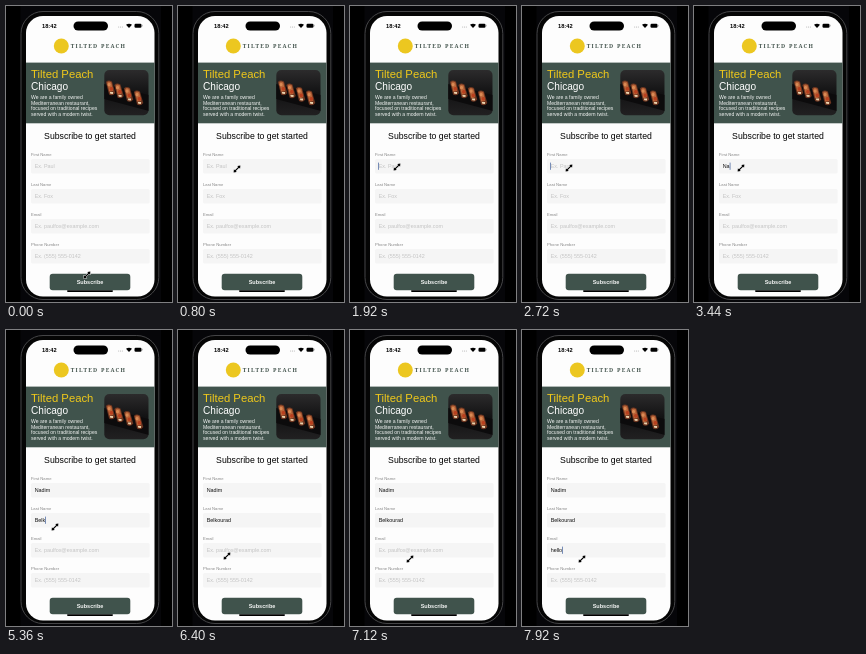
Write an HTML page that moves like this. It is 166 px wide and 296 px high and loops after 8 s.

```html
<!DOCTYPE html>
<html lang="en">
<head>
<meta charset="utf-8">
<title>Subscribe form</title>
<style>
  html, body { margin: 0; width: 100%; height: 100%; overflow: hidden; background: #000; }
  svg { display: block; width: 100vw; height: 100vh; font-family: "Liberation Sans", Arial, sans-serif; }
  .brand { font: 700 5.4px "Noto Serif", "Liberation Serif", serif; letter-spacing: 1.25px; fill: #43544d; }
  .intro { font-size: 5.1px; fill: #f4f6f5; }
  .label { font-size: 4.2px; fill: #858585; }
  .value { font-size: 5.4px; }
</style>
</head>
<body>
<svg viewBox="0 0 166 296">
  <defs>
    <clipPath id="photo"><rect x="98.3" y="64" width="44.2" height="45.3" rx="5"/></clipPath>
    <linearGradient id="table" x2="0" y2="1">
      <stop stop-color="#2c2b2c"/><stop offset=".5" stop-color="#121213"/><stop offset="1" stop-color="#222122"/>
    </linearGradient>
    <g id="bite">
      <path d="M-3-7Q0-9 3-6L3.4 6Q0 9-3 6Z" fill="#6e3620"/>
      <path d="M-2-6Q0-8 2.2-5L2 3Q0 4-2 3Z" fill="#b96539"/>
      <circle cx="-.6" cy="-3.6" r="1.6" fill="#d98a55"/>
      <circle cx=".6" cy="1" r="1.8" fill="#b8401f"/>
      <path d="M-1.6 3.6L1.6 4.4L1 6.4L-1.6 5.6Z" fill="#ead0ab"/>
    </g>
  </defs>
  <rect width="166" height="296"/>
  <rect x="14.5" width="140.5" height="296" fill="#060609"/>
  <rect x="15" y="5.5" width="137.8" height="288" rx="22" fill="#050505" stroke="#454547"/>
  <rect x="20" y="10" width="128.5" height="280.5" rx="17" fill="#fdfdfd"/>

  <text x="36" y="22" font-size="5.7" font-weight="700">18:42</text>
  <rect x="67.5" y="15.4" width="34.5" height="9.2" rx="4.6"/>
  <g fill="#aaa"><circle cx="112.7" cy="21" r=".5"/><circle cx="114.5" cy="21" r=".5"/><circle cx="116.3" cy="21" r=".5"/></g>
  <path d="M120 18.8Q123 16.5 126 18.8L123 22Z"/>
  <rect x="128.5" y="17.7" width="7" height="4" rx="1.2"/>
  <path d="M136.2 18.8v1.6" stroke="#888" stroke-width=".7"/>

  <circle cx="55.3" cy="40" r="7.5" fill="#ecc720"/>
  <text class="brand" x="64.8" y="42">TILTED PEACH</text>

  <rect x="20" y="56.6" width="128.5" height="60.7" fill="#40534c"/>
  <text x="25" y="72" font-size="11.3" fill="#f0c91a">Tilted Peach</text>
  <text x="25" y="84.3" font-size="10.1" fill="#fff">Chicago</text>
  <g class="intro">
    <text x="25" y="92.8">We are a family owned</text>
    <text x="25" y="98.6">Mediterranean restaurant,</text>
    <text x="25" y="104.4">focused on traditional recipes</text>
    <text x="25" y="110.2">served with a modern twist.</text>
  </g>
  <g clip-path="url(#photo)">
    <rect x="98" y="64" width="45" height="46" fill="url(#table)"/>
    <path d="M98 78L143 89V105L98 93Z" fill="#0c0b0c"/>
    <use href="#bite" transform="translate(104.5 82) rotate(-14)"/>
    <use href="#bite" transform="translate(113 85) rotate(-14)"/>
    <use href="#bite" transform="translate(122.5 88.5) rotate(-14)"/>
    <use href="#bite" transform="translate(132.5 92) rotate(-14)"/>
  </g>

  <text x="84" y="133" font-size="8.7" text-anchor="middle">Subscribe to get started</text>
  <g id="form"></g>
  <rect x="43.7" y="267.7" width="80.6" height="16.6" rx="3" fill="#40534c"/>
  <text x="84" y="278" font-size="5.5" font-weight="700" fill="#f4f6f5" text-anchor="middle">Subscribe</text>
  <rect x="61" y="284.3" width="46" height="1.6" rx=".8"/>
  <rect id="caret" width=".7" height="7.2" fill="#3f5f9c"/>
  <path id="cursor" d="M3.4-3.4L3.1-.2L2.1-1.2L-1.2 2.1L-.2 3.1L-3.4 3.4L-3.1.2L-2.1 1.2L1.2-2.1L.2-3.1Z"
        stroke="#fff" stroke-width=".8" paint-order="stroke" stroke-linejoin="round"/>
</svg>
<script>
const LOOP = 8000;
const $ = id => document.getElementById(id);

// keys: the moment each letter is typed
const fields = [
  { label: "First Name", hint: "Ex. Paul", text: "Nadim", focus: 1500, keys: [2960, 3200, 3560, 3760, 4000] },
  { label: "Last Name", hint: "Ex. Fox", text: "Belkourad", focus: 4560,
    keys: [4880, 5040, 5160, 5280, 5400, 5520, 5640, 5720, 5840] },
  { label: "Email", hint: "Ex. paulfox@example.com", text: "hello", focus: 6560, keys: [7160, 7280, 7400, 7520, 7680] },
  { label: "Phone Number", hint: "Ex. (555) 555-0142", text: "", focus: Infinity, keys: [] }
];

// time, x, y
const path = [
  [0, 81, 269], [80, 81, 269], [720, 59, 163], [960, 59, 163], [1440, 47, 161], [2000, 47, 161],
  [2500, 47, 162], [3680, 47, 162], [4240, 49, 197], [6200, 49, 197], [6400, 49, 226],
  [6600, 49, 226], [6960, 60, 229], [LOOP, 60, 229]
];

function add(tag, attrs, text = "") {
  const el = document.createElementNS("http://www.w3.org/2000/svg", tag);
  for (const k in attrs) el.setAttribute(k, attrs[k]);
  el.textContent = text;
  return $("form").appendChild(el);
}

fields.forEach((f, i) => {
  f.y = 153 + 30 * i;
  add("text", { class: "label", x: 25, y: f.y - 2.7 }, f.label);
  add("rect", { x: 25, y: f.y, width: 118.6, height: 14.5, rx: 1.5, fill: "#f5f5f5" });
  f.el = add("text", { class: "value", x: 28.7, y: f.y + 9.2 });
});

function cursorAt(t) {
  const i = path.findIndex(p => p[0] > t);
  const [t0, x0, y0] = path[i - 1], [t1, x1, y1] = path[i];
  const u = (t - t0) / (t1 - t0), e = u * u * (3 - 2 * u);
  return [x0 + (x1 - x0) * e, y0 + (y1 - y0) * e];
}

function draw(t) {
  let active = null;
  for (const f of fields) {
    f.count = f.keys.filter(k => k <= t).length;
    f.el.textContent = f.count ? f.text.slice(0, f.count) : f.hint;
    f.el.setAttribute("fill", f.count ? "#111" : "#c3c3c3");
    if (t >= f.focus) active = f;
  }
  const caret = $("caret");
  caret.setAttribute("visibility", "hidden");
  if (active) {
    const since = t - (active.count ? active.keys[active.count - 1] : active.focus);
    if (since % 1060 < 530) {
      caret.setAttribute("visibility", "visible");
      caret.setAttribute("x", 28.3 + (active.count ? active.el.getComputedTextLength() + .5 : 0));
      caret.setAttribute("y", active.y + 3.6);
    }
  }
  $("cursor").setAttribute("transform", `translate(${cursorAt(t)})`);
}

const start = performance.now();
function tick() {
  draw((performance.now() - start) % LOOP);
  requestAnimationFrame(tick);
}
tick();
</script>
</body>
</html>
```
